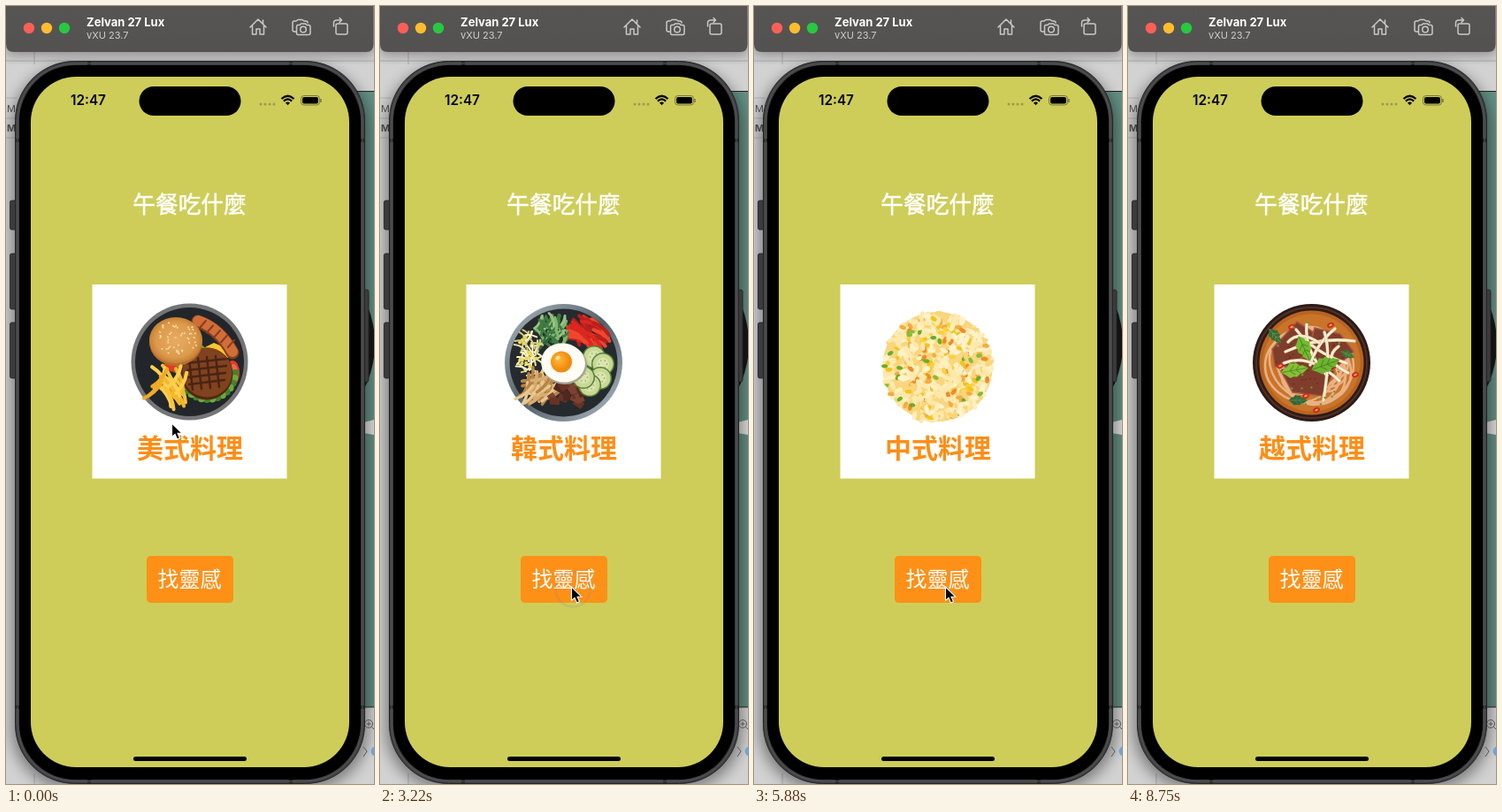
An HTML page for the animation above (8820 ms loop, 416 px wide and 880 px high).

```html
<!DOCTYPE html>
<html lang="zh-Hant">
<head>
<meta charset="utf-8">
<style>
html, body { margin: 0; height: 100%; overflow: hidden; background: #c4c4c4 }
svg { display: block }
text { font-family: Inter, "Noto Sans CJK TC", "Noto Sans CJK", sans-serif }
.cjk { font-family: "Noto Sans CJK TC", "Noto Sans CJK", sans-serif; text-anchor: middle }
.line { fill: none; stroke: #c9c8c7; stroke-width: 1.5; stroke-linejoin: round; stroke-linecap: round }
</style>
</head>
<body>
<svg width="416" height="880" viewBox="0 0 416 880">
  <defs>
    <filter id="shade" x="-20%" y="-20%" width="140%" height="140%"><feGaussianBlur stdDeviation="8"/></filter>
    <linearGradient id="bar" x2="0" y2="1"><stop stop-color="#575554"/><stop offset="1" stop-color="#535251"/></linearGradient>
    <linearGradient id="steel" x2="1" y2="1"><stop stop-color="#aebbc2"/><stop offset=".5" stop-color="#535f68"/><stop offset="1" stop-color="#b3bfc7"/></linearGradient>
    <radialGradient id="bun"><stop stop-color="#e7ac62"/><stop offset=".75" stop-color="#dc9a4c"/><stop offset="1" stop-color="#c67f35"/></radialGradient>
    <radialGradient id="yolk" cx=".4" cy=".4"><stop stop-color="#ffb83a"/><stop offset="1" stop-color="#f18a0c"/></radialGradient>
  </defs>

  <!-- desktop behind the device -->
  <rect width="416" height="880" fill="#d2d2d2"/>
  <path d="M0 62H416M32 52V66M32 868V880" stroke="#aaa" fill="none"/>
  <path d="M0 104H12M0 127H12M0 149H12" stroke="#b3b3b3"/>
  <g font-size="11" fill="#555"><text x="1" y="120">M</text><text x="1" y="142" font-weight="700">M</text></g>
  <rect x="396" y="96" width="20" height="697" fill="#648f84"/>
  <path d="M396 96.5H416M396 793H416" stroke="#222"/>
  <circle cx="303" cy="382" r="114" fill="#161616"/>
  <path d="M404 471L416 468V485L404 483Z" fill="#ddd"/>
  <rect x="6" y="68" width="404" height="818" rx="68" fill="#000" opacity=".4" filter="url(#shade)"/>
  <rect y="-4" width="416" height="58" fill="#000" opacity=".4" filter="url(#shade)"/>
  <g fill="none" stroke="#555"><circle cx="410" cy="812" r="4.5"/><path d="M407.500 812H412.500M410 809.500V814.500M413.500 815.500L417 819M404 838L408 843L404 849"/></g>
  <circle cx="418" cy="843" r="5.500" fill="#6aa5df"/>

  <!-- toolbar -->
  <path d="M0 0H415.500V43Q415.500 52 407 52H9Q0 52 0 43Z" fill="url(#bar)"/>
  <circle cx="26" cy="25" r="6.200" fill="#ff5f57"/><circle cx="46" cy="25" r="6.200" fill="#febc2e"/><circle cx="66" cy="25" r="6.200" fill="#28c840"/>
  <text x="91" y="23" font-size="13" font-weight="700" fill="#fff">Zelvan 27 Lux</text>
  <text x="91" y="37" font-size="11" fill="#cfcecd">vXU 23.7</text>
  <g class="line">
    <path d="M276 24L285 15L294 24M278.500 22V32H283V26H287V32H291.500V22M290.500 20V16"/>
    <path d="M328 29H326Q324 29 324 27V19Q324 17 326 17H328L330 15.500H335L337 17H339Q341 17 341 19"/>
    <path d="M330 21.500H332L333.500 20H338.500L340 21.500H342Q344 21.500 344 23.500V30.500Q344 32.500 342 32.500H330Q328.500 32.500 328.500 30.500V23.500Q328.500 21.500 330 21.500Z"/>
    <circle cx="336" cy="26.500" r="3.300"/>
    <rect x="373" y="20" width="13" height="12" rx="2"/><path d="M370.500 23V19Q370.500 16 374 16H379M377 13.500L379.500 16L377 18.500"/>
  </g>

  <!-- device -->
  <g fill="#3b3b3d" stroke="#222" stroke-width=".8">
    <rect x="4.500" y="220" width="9" height="33" rx="2"/><rect x="4.500" y="280" width="9" height="63" rx="2"/>
    <rect x="4.500" y="358" width="9" height="63" rx="2"/><rect x="402" y="321" width="8" height="104" rx="2"/>
  </g>
  <rect x="10.500" y="62.500" width="395" height="817" rx="67" fill="#404042" stroke="#262627"/>
  <path d="M11 152H15M401 152H405M11 793H15M401 793H405M94 63V67M322 63V67M94 875V879M322 875V879" stroke="#222" stroke-width="4"/>
  <rect x="13" y="65" width="390" height="812" rx="65" fill="none" stroke="#58585a"/>
  <rect x="15" y="67" width="386" height="808" rx="63" fill="#000"/>
  <rect x="28" y="80" width="360" height="781" rx="51" fill="#cecd59"/>
  <rect x="150.500" y="91" width="115" height="33" rx="16.500"/>
  <text x="73" y="112" font-size="15.300" font-weight="600">12:47</text>
  <path d="M288 111H304" stroke="#9c9b48" stroke-width="3" stroke-linecap="round" stroke-dasharray="0 5"/>
  <path d="M311.500 105Q318.500 98.500 325.500 105M313.900 107.600Q318.500 103.300 323.100 107.600" fill="none" stroke="#000" stroke-width="2.200"/>
  <path d="M316 109.600Q318.500 107.400 321 109.600L318.500 112.300Z"/>
  <rect x="333.500" y="101.500" width="21" height="10.500" rx="3.200" fill="none" stroke="#77763a"/><rect x="335" y="103" width="18" height="7.500" rx="2"/>
  <path d="M356 105V109" stroke="#77763a" stroke-width="1.500"/>
  <rect x="144" y="849" width="128" height="5" rx="2.500"/>

  <!-- app -->
  <text class="cjk" x="207.500" y="234" font-size="25.700" font-weight="500" fill="#fff" stroke="#fff" stroke-width=".5">午餐吃什麼</text>
  <rect x="97.500" y="315" width="220" height="219.500" fill="#fff"/>
  <g id="dishes"></g>
  <text id="label" class="cjk" x="208" y="511" font-size="30" font-weight="700" fill="#ff8e16"></text>
  <rect x="159" y="622" width="98" height="53" rx="4.500" fill="#ff9017"/>
  <text class="cjk" x="207.500" y="657" font-size="24" font-weight="300" fill="#fff">找靈感</text>
  <circle id="ring" cx="218" cy="660" r="19.500" fill="none" stroke="#76828a" stroke-width="3"/>
  <path id="cursor" d="M0 0V15.500L3.500 12.300L6 18L9 16.700L6.600 11.200H11.300Z" stroke="#fff" stroke-width="1.100"/>
</svg>
<script>
const LOOP = 8820;
const byId = id => document.getElementById(id);

let seed = 7;
const rnd = (a = 0, b = 1) => a + (b - a) * ((seed = seed * 16807 % 2147483647) / 2147483647);
const pick = list => list[Math.floor(rnd(0, list.length))];

const oval = (x, y, rx, ry, fill, turn = 0, extra = '') =>
  `<ellipse cx="${x}" cy="${y}" rx="${rx}" ry="${ry}" fill="${fill}" transform="rotate(${turn} ${x} ${y})" ${extra}/>`;
const disc = (x, y, r, fill, extra) => oval(x, y, r, r, fill, 0, extra);
const shape = (d, fill) => `<path d="${d}" fill="${fill}"/>`;
const stroke = (d, color, w) =>
  `<path d="${d}" fill="none" stroke="${color}" stroke-width="${w}" stroke-linecap="round"/>`;
const times = (n, fn) => Array.from({ length: n }, (_, i) => fn(i)).join('');
// n random points inside an ellipse
const scatter = (n, x, y, rx, ry, fn) => times(n, () => {
  const a = rnd(0, 2 * Math.PI), r = Math.sqrt(rnd());
  return fn(x + rx * r * Math.cos(a), y + ry * r * Math.sin(a));
});
const sticks = (n, x, y, rx, ry, len, from, to, w, colors) => scatter(n, x, y, rx, ry, (px, py) => {
  const a = rnd(from, to) * Math.PI / 180, dx = len / 2 * Math.cos(a), dy = len / 2 * Math.sin(a);
  return stroke(`M${px - dx} ${py - dy}Q${px + dy / 3} ${py - dx / 3} ${px + dx} ${py + dy}`, pick(colors), w);
});

function american() {
  return disc(207.5, 402.5, 66, '#747577') + disc(207.5, 402.5, 61.5, '#22262a') +
    scatter(16, 204, 402, 28, 12, (x, y) => disc(x, y, 4, pick(['#64a33a', '#4c8b2e']))) +
    oval(199, 404, 21, 9, '#e23b25', -12) + oval(208, 396, 19, 8, '#67ab37', -35) +
    oval(256, 415, 8, 14, '#df3d26') + oval(257, 415, 5, 10, '#f0684a') +
    shape('M219 389L235 381L254 389L250 401Z', '#ffc531') +
    times(17, i => disc(228 + 31 * Math.cos(i / 5), 415 + 30 * Math.sin(i / 5), 4, i % 2 ? '#6aaa3a' : '#44822d')) +
    disc(227, 416, 29.5, '#542812') + disc(227.5, 414.5, 28, '#80421f') +
    times(4, i => stroke(`M${207 + i * 10} ${399 - i}L${211 + i * 10} ${434 - i}M${204 + i} ${404 + i * 8}L${250 - i} ${399 + i * 8}`, '#4a2413', 2.4)) +
    stroke('M217 357Q241 365 256 392', '#883b1b', 15) + stroke('M217 356Q241 364 256 391', '#cf6e38', 12) +
    times(5, i => stroke(`M${219 + i * 8} ${364 + i * 5.5}l7 -8`, '#8b3c1e', 2)) +
    oval(192, 380, 30, 27, '#b56f2e') + oval(192, 378, 30, 26, 'url(#bun)') +
    scatter(50, 193, 375, 25, 19, (x, y) => oval(x, y, 1.2, .8, '#f9dda6', rnd(0, 180))) +
    sticks(15, 182, 430, 20, 14, 28, 35, 75, 4, ['#f5b72c', '#ffd052', '#dc951f', '#f8c43d']) +
    sticks(6, 181, 430, 18, 14, 26, 105, 140, 4, ['#ffcf50', '#f0aa27']);
}

function korean() {
  const cucumber = (x, y) => disc(x, y, 13, '#57813c') + disc(x, y, 11.5, '#c8d994') + disc(x, y, 7, '#dce5b1') +
    times(6, i => disc(x + 4.5 * Math.cos(i * 1.05), y + 4.5 * Math.sin(i * 1.05), .9, '#9eb568'));
  return disc(207.5, 403.5, 66.5, 'url(#steel)') + disc(207.5, 403.5, 61, '#252a2e') +
    sticks(42, 194, 368, 20, 16, 15, 35, 145, 3, ['#3e7b42', '#81b66d', '#28633b', '#9ac080']) +
    sticks(45, 236, 374, 18, 15, 22, 15, 65, 4, ['#db281e', '#ef4630', '#b7201c']) +
    sticks(40, 167, 394, 13, 24, 13, 0, 180, 2, ['#efe7a3', '#fbf5cd', '#d5cd7e']) +
    scatter(16, 165, 394, 12, 24, (x, y) => disc(x, y, 2, '#e8d85e')) +
    sticks(42, 180, 431, 20, 14, 24, 100, 165, 3.5, ['#d7ad70', '#b98345', '#e7c78f']) +
    scatter(22, 213, 440, 19, 13, (x, y) => `<rect x="${x - 5}" y="${y - 4}" width="11" height="8" fill="${pick(['#673326', '#7d4330', '#512820'])}" transform="rotate(${rnd(0, 90)} ${x} ${y})"/>`) +
    cucumber(242, 397) + cucumber(252, 405) + cucumber(249, 421) + cucumber(237, 429) + cucumber(230, 420) +
    oval(209, 406, 25, 22, '#a9a392') + oval(207, 403.5, 25, 22, '#fffdf4', 10) +
    disc(205, 402.5, 12, 'url(#yolk)') + oval(201, 398, 3, 2, '#ffe09a', -35);
}

function japanese() {
  const roll = (x, y, r, fill) =>
    shape(`M${x - r} ${y}V${y + r * 1.2}Q${x} ${y + r * 2} ${x + r} ${y + r * 1.2}V${y}Z`, '#20252a') +
    stroke(`M${x - r + 3} ${y + 9}V${y + r * 1.3}`, '#49515a', 1.5) +
    oval(x, y, r, r * .68, '#262b2e') + oval(x, y, r - 1.8, r * .57, '#f7f4eb') + oval(x, y, r * .52, r * .38, fill);
  const nigiri = (x, y, fill, turn, light) => oval(x, y + 9, 20, 11, '#e6e5df', turn) + oval(x, y + 7, 19, 9, '#fafaf3', turn) +
    oval(x, y, 20, 9.5, fill, turn) +
    times(4, i => stroke(`M${x - 13 + i * 7} ${y - 5}q4 4 5 9`, light, 1.2));
  return disc(207.5, 403.5, 64, '#fdfdfd', 'stroke="#d3d3d3"') + disc(207.5, 403.5, 56.5, '#c5c8c9') +
    roll(174, 372, 15, '#bf4c35') + roll(204.5, 366, 15, '#edb25f') + roll(235, 368, 15, '#a1a53a') +
    nigiri(246, 390, '#ed763a', 10, '#f18c56') + nigiri(222, 392, '#e74627', 10, '#ff8459') +
    nigiri(193, 397, '#f06b24', -10, '#ffb17b') +
    oval(172, 411, 20, 11, '#f5f3e8', 8) + oval(171, 401, 20, 10, '#f7d368', 8) +
    shape('M168 391L185 394L178 424L164 422Q160 406 168 391Z', '#24292c') +
    roll(191, 426, 19.5, '#d7644c') + oval(190, 422, 6, 3.5, '#f3b52c') +
    roll(229, 421, 20.5, '#f48b6b') + oval(229, 417, 13, 4.5, '#a6bd58') +
    times(5, i => stroke(`M${219 + i * 4} 426l4 -5`, '#ffdac6', 1.4));
}

function chinese() {
  const cream = ['#fff0c0', '#ffe8a8', '#fbd57c', '#fff3cc', '#ffe9ae'];
  const grains = (n, rx, ry, colors) => scatter(n, 207.5, 408.5, 61, 61, (x, y) => oval(x, y, rx, ry, pick(colors), rnd(0, 180)));
  return disc(207.5, 408, 62, '#f9d67f') + grains(330, 5.5, 2.8, cream) +
    grains(110, 4, 2.4, ['#f08b2b', '#f4ad41', '#f6d23e', '#f2c51e']) +
    grains(22, 3.5, 2.2, ['#69ad2d', '#83bf37']) + grains(110, 5, 2.5, cream);
}

function vietnamese() {
  const leaf = (x, y, turn, size, fill, vein) => `<g transform="translate(${x} ${y}) rotate(${turn}) scale(${size})">` +
    shape('M-15 0L-10 -5L-7 -5L-4 -9L0 -7L3 -8L7 -4L10 -4L16 0L9 5L6 5L2 8L-2 7L-6 8L-10 4Z', fill) +
    stroke('M-14 0H14M-5 0L0 -5M-5 0L0 5M2 0L6 -4M2 0L6 4', vein, 1) + '</g>';
  const chili = (x, y) => oval(x, y, 4, 3, '#c92b1d', -25) + oval(x, y, 2, 1.2, '#f0a061', -25);
  const meat = d => shape(d, '#803d2c') + stroke(d, '#a65b40', 1.5);
  return disc(207.5, 403.5, 66.5, '#2d1b17') + disc(207.5, 403.5, 62.5, 'none', 'stroke="#513026" stroke-width="2"') +
    disc(207.5, 403.5, 59, '#b96420') + disc(207.5, 403.5, 55, '#c8752a') +
    times(9, i => oval(205 + i, 407, 50 - i * 2, 42 - i * 3, 'none', i * 29, 'stroke="#eab183" stroke-width="2.500"')) +
    meat('M163 388L191 357L216 373L194 407L166 408Z') + meat('M211 364L240 371L255 391L227 416L203 391Z') +
    meat('M173 413L202 394L233 414L219 441L186 437Z') +
    scatter(65, 208, 401, 36, 33, (x, y) => disc(x, y, .8, '#5f2a21')) +
    leaf(166, 373, 50, .7, '#356d35', '#6b964d') + leaf(192, 446, 0, .7, '#2f6738', '#639048') + leaf(248, 394, 25, .55, '#3a7036', '#719c51') +
    ['M190 366Q210 392 247 404', 'M178 391Q213 374 256 379', 'M202 360Q199 390 225 418', 'M234 365Q213 382 206 406', 'M176 404Q205 392 239 424', 'M222 369Q230 391 221 446', 'M181 380Q194 366 216 381', 'M238 385Q218 400 249 415']
      .map(d => stroke(d, '#d9b78d', 3.6) + stroke(d, '#fff1d5', 2.5)).join('') +
    leaf(199, 387, 65, 1, '#75b92f', '#4b8a28') + leaf(223, 406, -20, 1.1, '#70b42e', '#4a8926') + leaf(188, 412, -10, 1, '#85bf35', '#538f29') +
    chili(229, 361) + chili(172, 407) + chili(185, 363) + chili(257, 417) + chili(201, 441) + chili(213, 457) +
    scatter(18, 208, 404, 50, 50, (x, y) => disc(x, y, 1.2, '#6e9834'));
}

const menu = [
  { at: 0, name: '美式料理', draw: american },
  { at: 3000, name: '韓式料理', draw: korean },
  { at: 4130, name: '日式料理', draw: japanese },
  { at: 5180, name: '中式料理', draw: chinese },
  { at: 6510, name: '越式料理', draw: vietnamese }
];
byId('dishes').innerHTML = menu.map(dish => `<g>${dish.draw()}</g>`).join('');
const plates = [...byId('dishes').children];

// time, x, y of the pointer tip
const route = [[0, 187.5, 472], [350, 187.5, 472], [1000, 188, 580], [1600, 217.5, 658], [2660, 217.5, 658],
  [2800, 216.5, 657], [7350, 216.5, 657], [7800, 345, -22], [LOOP, 345, -22]];

function pointerAt(t) {
  const i = route.findIndex(stop => stop[0] > t), [t0, x0, y0] = route[i - 1], [t1, x1, y1] = route[i];
  const p = (t - t0) / (t1 - t0), e = p * p * (3 - 2 * p);
  return [x0 + (x1 - x0) * e, y0 + (y1 - y0) * e];
}

function ringAt(t) {
  return Math.max(...menu.slice(1).map(({ at }) =>
    t < at - 210 ? 0 : t < at ? Math.min(1, (t - at + 210) / 70) : Math.max(0, 1 - (t - at) / 280)));
}

function render(now) {
  const t = now % LOOP, current = menu.filter(dish => dish.at <= t).length - 1;
  plates.forEach((plate, i) => plate.style.display = i === current ? '' : 'none');
  byId('label').textContent = menu[current].name;
  byId('ring').style.opacity = ringAt(t) * .75;
  byId('cursor').setAttribute('transform', `translate(${pointerAt(t)})`);
  requestAnimationFrame(() => render(performance.now() - start));
}
const start = performance.now();
render(0);
</script>
</body>
</html>
```
